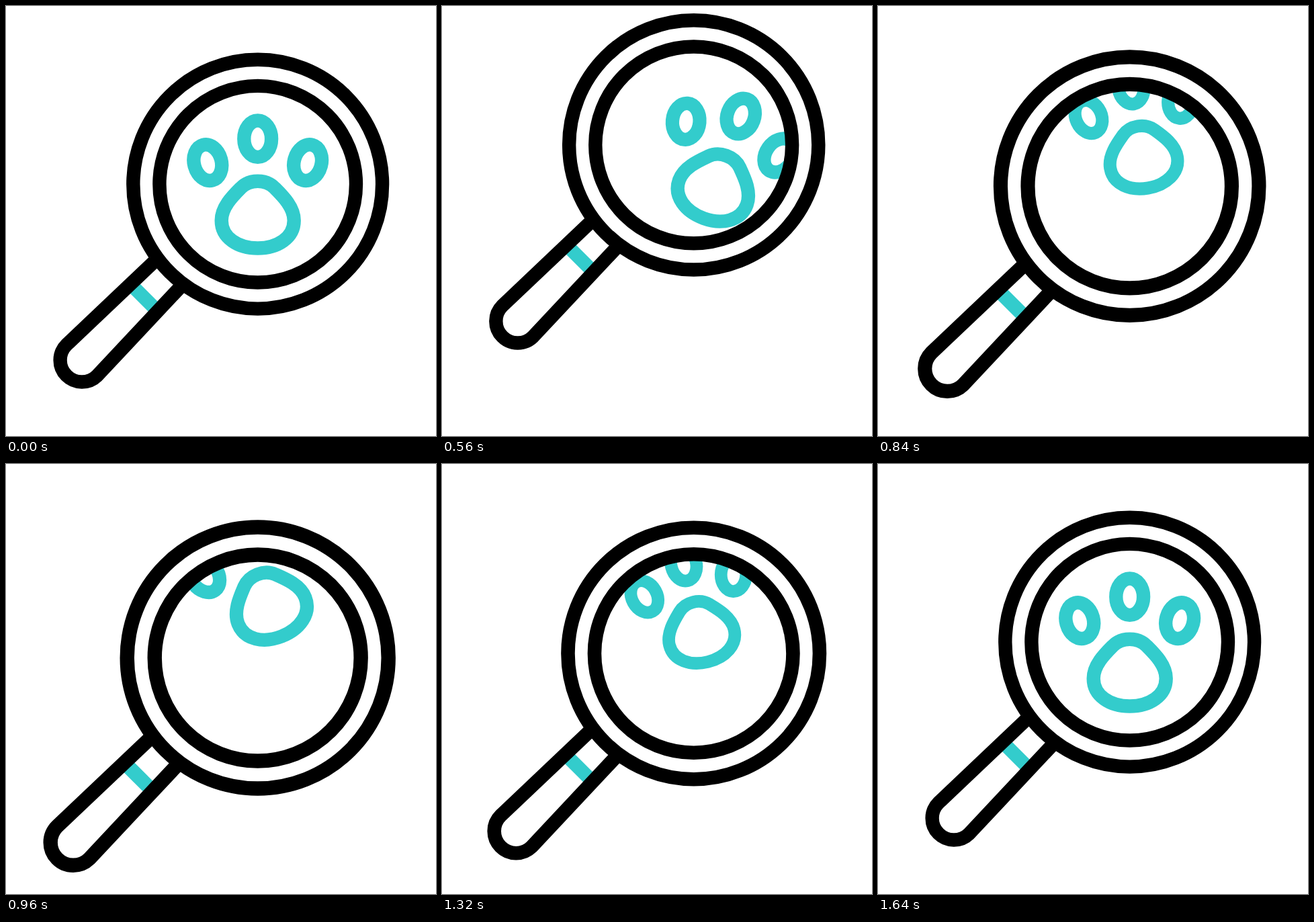
Animation of 640 by 640 pixels, one loop 2 s. Source, as an HTML page:

```html
<!DOCTYPE html>
<html lang="en">
<head>
<meta charset="utf-8">
<title>Paw under a magnifying glass</title>
<style>
  html, body { margin: 0; width: 100%; height: 100%; overflow: hidden; background: #fff; }
  svg { display: block; width: 100vw; height: 100vh; }
  g { fill: none; stroke-width: 20.4; }
  #paw, .band { stroke: #3cc; }
  #glass { stroke: #000; }
</style>
</head>
<body>
<svg viewBox="0 0 640 640">
  <clipPath id="lens"><circle id="hole" r="146"/></clipPath>

  <!-- both groups are drawn around their own pivot -->
  <g clip-path="url(#lens)">
    <g id="paw">
      <ellipse id="toe" cy="-67.5" rx="20.4" ry="27.2"/>
      <use href="#toe" transform="translate(-74.4 -32) rotate(-15) translate(0 67.5)"/>
      <use href="#toe" transform="translate(74.4 -32) rotate(15) translate(0 67.5)"/>
      <path d="M0-4.4C11-4.4 19-.6 25 5.4C37 17.4 54 34 54 54C54 80 29 95.3 0 95.3S-54 80-54 54C-54 34-37 17.4-25 5.4C-19-.6-11-4.4 0-4.4Z"/>
    </g>
  </g>
  <g id="glass">
    <path class="band" d="M-189 149l40 40"/>
    <path d="M-148 109.5L-284.5 239A32 32 0 0 0-239 285L-110.5 148"/>
    <circle r="185.4"/>
    <circle r="146.3"/>
  </g>
</svg>
<script>
  const LOOP = 2000, STEP = 40;
  const X = 374.7, Y = 265.2;

  const [paw, glass, hole] = ['paw', 'glass', 'hole'].map(id => document.getElementById(id));

  // eased progress from 0 to 1
  function ramp(t, start, length) {
    const u = Math.min(1, Math.max(0, (t - start) / length));
    return u * u * (3 - 2 * u);
  }

  // 1 halfway through a move, 0 at both ends
  const hump = p => 4 * p * (1 - p);

  function place(el, x, y, turn, size) {
    el.setAttribute('transform', `translate(${x} ${y}) rotate(${turn}) scale(${size})`);
  }

  function draw() {
    // the motion runs at 25 poses per second
    const t = Math.floor(performance.now() % LOOP / STEP) * STEP;
    const rise = ramp(t, 80, 320);
    const fall = ramp(t, 520, 480), swing = ramp(t, 520, 520);
    const home = ramp(t, 1120, 440), settle = ramp(t, 1120, 520), shrink = ramp(t, 1120, 280);

    const glassY = Y - 60 * rise + 85 * fall - 25 * settle;
    const size = 1 + .05 * (fall - shrink);
    place(glass, X, glassY, 0, size);
    place(hole, X, glassY, 0, size);

    place(paw,
      X + 48 * (rise - fall),
      Y - 37 * rise - 61 * fall + 98 * home,
      20.8 * rise - 45.3 * swing + 24.5 * home,
      1 - .083 * (hump(rise) + hump(fall) + hump(home)));

    requestAnimationFrame(draw);
  }
  draw();
</script>
</body>
</html>
```
